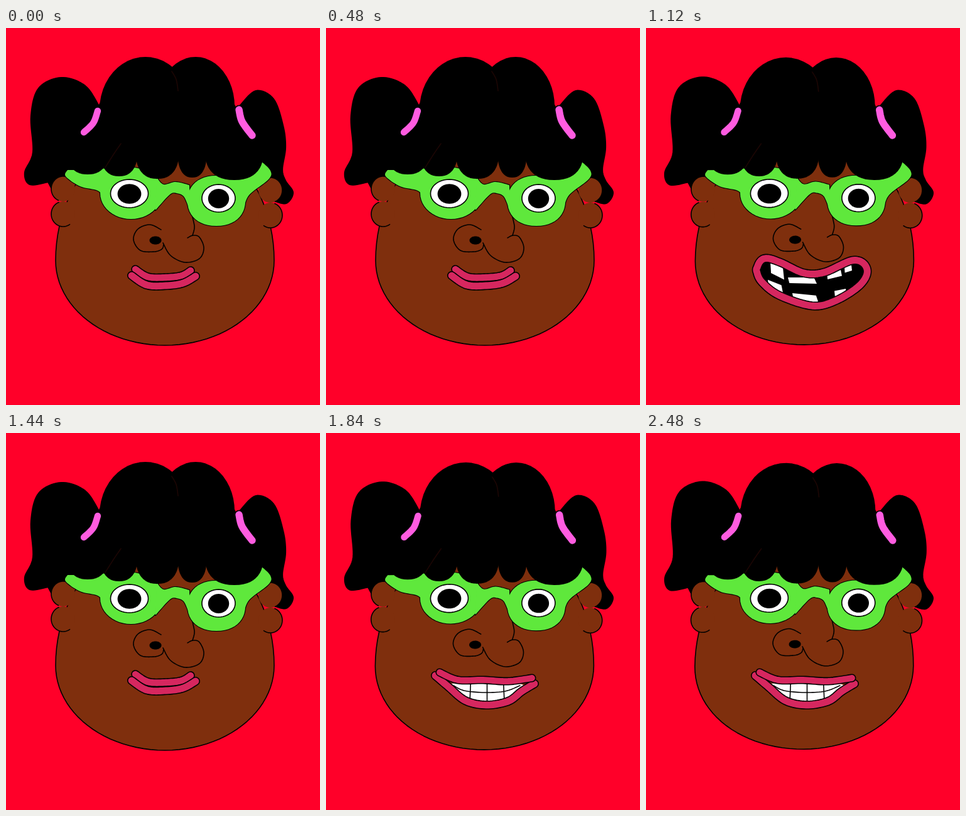
These frames come from a looping animation (500 by 600 pixels, 2.56 s). An HTML page with a canvas:

```html
<!DOCTYPE html>
<html lang="en">
<head>
<meta charset="utf-8">
<title>Changing smile</title>
<style>
html, body { margin: 0; width: 100%; height: 100%; overflow: hidden; background: #ff0029; }
canvas { display: block; width: 500px; height: 600px; }
</style>
</head>
<body>
<canvas id="stage" width="500" height="600"></canvas>
<script>
const ctx = document.getElementById('stage').getContext('2d');
const RED = '#ff0029', SKIN = '#7f2f0d', GREEN = '#5fe83c', PINK = '#ff5ce0', LIP = '#d6275f';
const INK = '#000', WHITE = '#fff', LINE = 1.6;
const STEP = 80, STEPS = 32, PI = Math.PI;
let sway = 0;

// Points on a (super)ellipse; n > 2 makes it squarer.
function arc(x, y, rx, ry, from = 0, to = 2 * PI, n = 2) {
  const bend = v => Math.sign(v) * Math.abs(v) ** (2 / n);
  return Array.from({ length: 49 }, (_, i) => {
    const a = from + (to - from) * i / 48;
    return [x + rx * bend(Math.cos(a)), y + ry * bend(Math.sin(a))];
  });
}

// Points on a smooth curve through "x,y" keys; "/" marks a sharp corner.
function spline(text) {
  const out = [];
  let last = null;
  for (const part of text.split('/')) {
    const keys = part.trim().split(' ').map(p => p.split(',').map(Number));
    if (last) keys.unshift(last);
    last = keys.at(-1);
    const at = i => keys[Math.max(0, Math.min(keys.length - 1, i))];
    for (let i = 0; i < keys.length - 1; i++) {
      const [a, b, c, d] = [at(i - 1), at(i), at(i + 1), at(i + 2)];
      for (let t = 0; t < 1; t += 0.1) {
        out.push([0, 1].map(k => b[k] + t / 2 * (c[k] - a[k]
          + t * (2 * a[k] - 5 * b[k] + 4 * c[k] - d[k] + t * (3 * (b[k] - c[k]) + d[k] - a[k])))));
      }
    }
    out.push(last);
  }
  return out;
}

// The hand-drawn wobble: a gentle warp of every point of the head.
function trace(points, closed) {
  const path = new Path2D();
  for (const [x, y] of points) {
    path.lineTo(x + sway * 1.8 * Math.cos(y / 160),
      y + sway * 2.5 * Math.sin((x - 150) / 80) * Math.cos(y / 130));
  }
  if (closed) path.closePath();
  return path;
}

function stroke(path, color = INK, width = LINE) {
  ctx.strokeStyle = color;
  ctx.lineWidth = width;
  ctx.stroke(path);
}

function fill(path, color) {
  ctx.fillStyle = color;
  ctx.fill(path);
}

const line = (points, color) => stroke(trace(points), color);

// Several shapes that share one outline.
function merge(color, ...shapes) {
  const paths = shapes.map(s => trace(s, true));
  paths.forEach(p => stroke(p, INK, 2 * LINE - 1));
  paths.forEach(p => fill(p, color));
}

function shape(points, color) {
  const path = trace(points, true);
  fill(path, color);
  stroke(path);
}

// A thick round-ended strip with an outline.
function band(points, width, color, closed) {
  const path = trace(points, closed);
  stroke(path, INK, width + LINE);
  stroke(path, color, width - LINE);
}

function clipped(path, draw) {
  ctx.save();
  ctx.clip(path);
  draw();
  ctx.restore();
}

function ear(side) {
  const lobe = (x, y, rx, ry, from, to) => {
    const place = pts => pts.map(([px, py]) => side < 0 ? [px, py] : [512 - px, py + 2]);
    fill(trace(place(arc(x, y, rx, ry)), true), SKIN);
    line(place(arc(x, y, rx, ry, from, to)));
  };
  lobe(91, 256, 19, 20, -1.2, -4.3);
  lobe(91, 296, 19, 20, -1.95, -5.3);
}

function nose() {
  line(spline('247,321 229,313 210,320 203,337 214,354 236,356 248,352 251,345'));
  line(spline('250,342 262,362 285,373 308,367 315,350 308,333 298,330 289,334'));
  line(spline('289,268 298,305 300,318 297,330'));
  fill(trace(arc(238, 338, 9.5, 6.5), true), INK);
}

function glasses() {
  merge(GREEN,
    arc(199, 263, 49, 41),
    arc(335, 275, 46, 40, 0, 2 * PI, 2.2),
    spline('240,238 251,249 270,245 292,250 / 292,284 283,268 272,263 261,265 238,290'),
    spline('98,226 95,236 118,252 148,260 158,279 / 180,228 120,226'),
    spline('405,211 421,227 418,241 387,266 378,290 / 362,243 395,228'));
  for (const [x, y, rx, ry] of [[196.5, 263.5, 30, 22.5], [338.5, 271, 26.5, 22]]) {
    shape(arc(x, y, rx, ry), WHITE);
    fill(trace(arc(x, y + 0.5, rx * 0.63, ry * 0.7), true), INK);
  }
}

function hair() {
  const lobes = [[130, 31, 232], [180, 28, 235], [241, 33, 239], [296.5, 22, 237], [363.5, 45, 241]];
  merge(INK,
    arc(222, 130, 72, 83),
    arc(302, 125, 61, 78),
    spline('150,120 130,172 101,203 / 408,203 / 388,172 363,122'),
    ...lobes.map(([x, half, low]) => arc(x, 200, half, low - 200, 0, 2 * PI, 2.3)));
  line(spline('264,69 271,82 274,100'), '#1c0604');
  line(spline('183,184 172,200 158,222'), '#1c0604');
}

function head() {
  merge(INK,
    spline('149,126 126,92 88,79 52,96 40,140 43,198 30,230 38,249 67,245 / 73,256 / 110,235 130,190'),
    spline('372,124 398,100 426,113 441,155 445,190 440,225 445,243 457,262 446,279 424,274 / 405,230 390,170'));
  shape([...arc(253, 370, 174, 135, 0, PI), ...arc(253, 370, 174, 210, PI, 2 * PI)], SKIN);
  ear(-1);
  ear(1);
  nose();
  glasses();
  hair();
  band(spline('146,132 139,151 124,166'), 12, PINK);
  band(spline('371,130 376,149 392,171'), 13, PINK);
}

function closedMouth() {
  band(spline('206,384 226,396 255,397 280,394 294,386'), 12, LIP);
  band(spline('200,394 224,409 255,410 282,406 302,395'), 12.5, LIP);
}

// Upright gaps between teeth, fanning out from the middle.
function gaps(count, x, pitch, fan) {
  for (let i = 0; i < count; i++) {
    const lean = (i - (count - 1) / 2) * fan;
    line([[x + i * pitch - lean, 370], [x + i * pitch + lean, 440]]);
  }
}

function smile() {
  const teeth = trace(spline('195,399 250,397 314,401 287,426 250,430 217,420'), true);
  fill(teeth, WHITE);
  clipped(teeth, () => {
    gaps(3, 230, 26.5, 1.5);
    line(spline('203,402 220,410 252,413 285,411 309,402'));
  });
  band(spline('174,386 195,404 222,426 255,433 290,427 312,411 332,399'), 12.5, LIP);
  band(spline('181,381 210,393 250,393 290,395 328,390'), 11.5, LIP);
}

function wideMouth(inside, teeth) {
  const rim = spline('182,385 190,373 212,379 250,396 285,395 330,376 346,386 335,406 300,428 265,436 215,420 189,400 182,385');
  const path = trace(rim, true);
  band(rim, 25, LIP, true);
  fill(path, inside);
  clipped(path, teeth);
  stroke(path);
}

function grinTeeth() {
  gaps(6, 198, 26.4, 1.6);
  line(spline('181,386 215,406 262,415 310,407 345,387'));
}

function brokenTeeth() {
  const teeth = [[209, 386, 22, 20, 0.4], [249, 402, 46, 10, 0], [300, 392, 24, 12, -0.3],
    [322, 383, 12, 11, -0.4], [206, 411, 24, 11, 0.4], [254, 430, 42, 12, 0.1], [310, 422, 20, 11, -0.2]];
  for (const [x, y, w, h, tilt] of teeth) {
    const quad = [[-1, -1], [0.8, -1], [1, 1], [-0.9, 0.8]].map(([u, v]) =>
      [x + u * w / 2, y + v * h / 2 + u * w / 2 * tilt]);
    fill(trace(quad, true), WHITE);
  }
}

// Each half loop: 7 steps closed, 1 smile, 7 wide open, 1 smile.
function mouth(step) {
  const k = step % 16;
  if (k < 7) closedMouth();
  else if (k % 8 === 7) smile();
  else if (step < 16) wideMouth(INK, brokenTeeth);
  else wideMouth(WHITE, grinTeeth);
}

function draw(step) {
  fill(new Path2D('M0 0H500V600H0Z'), RED);
  sway = [0, 1, 0.5][step % 3];
  head();
  sway = 0;
  mouth(step);
}

ctx.lineJoin = ctx.lineCap = 'round';
const start = performance.now();
let shown = -1;

function tick(now) {
  const step = Math.floor(Math.max(0, now - start) / STEP) % STEPS;
  if (step !== shown) draw(shown = step);
  requestAnimationFrame(tick);
}
tick(start);
</script>
</body>
</html>
```
